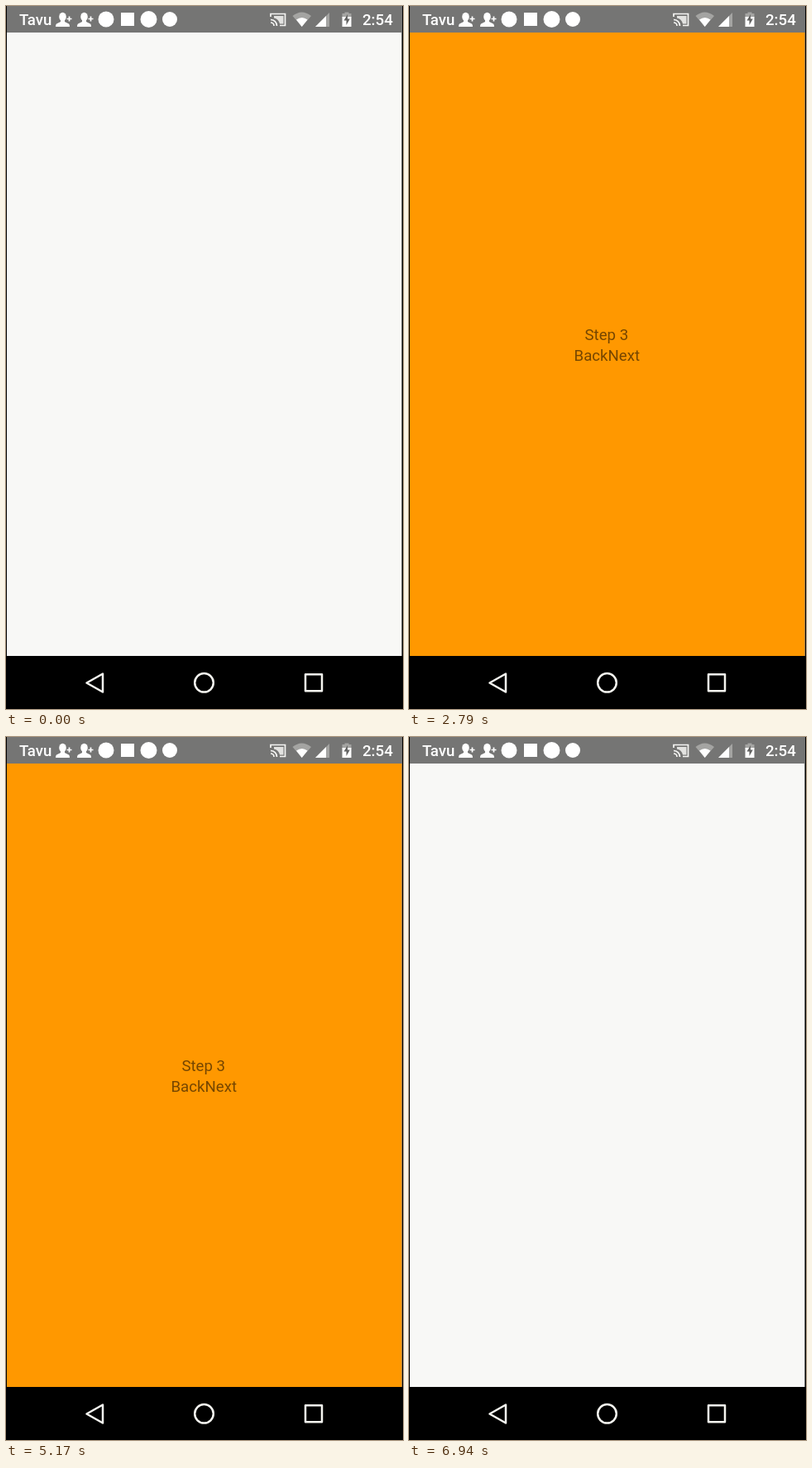
Recreate the animation shown at these times as an HTML page. Size 480x848 px, loop 6.98 s.

```html
<!DOCTYPE html>
<html lang="en">
<head>
<meta charset="utf-8">
<title>Step wizard</title>
<style>
  html, body { margin: 0; width: 100%; height: 100%; overflow: hidden; background: #000; }
  svg { display: block; width: 480px; height: 848px; }
  text { font-family: Roboto, sans-serif; font-size: 18.67px; }
  .label { fill: #000; fill-opacity: .54; text-anchor: middle; }
  .status { fill: #fff; font-weight: 500; }
  .dim { fill: #a4a4a2; }
  .nav { fill: none; stroke: #f5f5f0; stroke-width: 2.5; stroke-linejoin: round; }
</style>
</head>
<body>
<svg viewBox="0 0 480 848">
  <defs>
    <clipPath id="screen"><rect x="1" y="32" width="477.5" height="752"/></clipPath>
    <g id="contact">
      <ellipse cx="8.5" cy="13" rx="4.3" ry="5.2"/>
      <path d="M6 16h5v3l5 2.500q1 .6 1 3.500H0q0-2.900 1-3.500l5-2.500z"/>
      <path d="M13.500 15.500h6M16.500 12.500v6" stroke="#fff" stroke-width="1.7"/>
    </g>
  </defs>

  <rect x="1" width="477.5" height="784" fill="#f8f8f6"/>
  <g clip-path="url(#screen)">
    <g id="page">
      <rect id="fill" x="1" y="32" width="478" height="752"/>
      <text id="title" class="label" x="238.8" y="403"></text>
      <text class="label" x="239.3" y="428">BackNext</text>
    </g>
  </g>

  <rect x="1" width="477.5" height="32" fill="#757574"/>
  <g fill="#fff">
    <text class="status" x="16" y="23">Tavu</text>
    <use href="#contact" x="60"/>
    <use href="#contact" x="86"/>
    <circle cx="121" cy="16" r="9.5"/>
    <rect x="139" y="8" width="16" height="16"/>
    <circle cx="172.5" cy="16" r="10"/>
    <circle cx="198" cy="16" r="9"/>
    <path d="M320 13v-3.500h17.500v14H331M320 16.500a7.500 7.500 0 0 1 7.500 7.500M320 20a4 4 0 0 1 4 4" fill="none" stroke="#f5f5f3" stroke-width="1.7"/>
    <path d="M324 12h11.500v9.500H331q-1.500-6-7-7z" fill="#e2e2e0"/>
    <path class="dim" d="M346.500 12Q357.500 3 369 12L357.700 25z"/>
    <path d="M351 16.500Q357.700 11.500 364.500 16.500L357.700 25z"/>
    <path class="dim" d="M391 8v17h-17z"/>
    <path d="M387 12v13h-13z"/>
    <path class="dim" d="M406.500 9h3V7.500h5V9h3v5h-11z"/>
    <path d="M406.500 13h11v12h-11z"/>
    <path d="M413 10l-4.500 7.500h3V23l4.300-7.500H413z" fill="#636362"/>
    <text class="status" x="431" y="23">2:54</text>
  </g>

  <g class="nav">
    <path d="M97.500 816.500L117 805.500v22z"/>
    <circle cx="239.5" cy="816.3" r="11.3"/>
    <rect x="362" y="806.3" width="20" height="20"/>
  </g>
</svg>
<script>
  const LOOP = 6980, WIDTH = 480;
  const COLORS = { 2: '#fac858', 3: '#ff9800', 4: '#2094f5' };
  // Each page springs in from one side: -1 left, 1 right.
  const MOVES = [
    { at: 0, step: 2, side: -1 },
    { at: 1084.7, step: 3, side: -1 },
    { at: 2966, step: 4, side: -1 },
    { at: 4224.7, step: 3, side: 1 },
    { at: 5689.7, step: 2, side: 1 },
    { at: 6930, step: 1, side: 1 }
  ];
  const STIFFNESS = 230, DAMPING = 22;
  const decay = DAMPING / 2, freq = Math.sqrt(STIFFNESS - decay * decay);
  const [page, fill, title] = ['page', 'fill', 'title'].map(id => document.getElementById(id));

  // Remaining share of the distance after s seconds.
  function spring(s) {
    return Math.exp(-decay * s) * (Math.cos(freq * s) + decay / freq * Math.sin(freq * s));
  }

  let shown = 0;
  function show(step) {
    if (step === shown) return;
    shown = step;
    page.style.display = COLORS[step] ? '' : 'none';
    fill.setAttribute('fill', COLORS[step] || 'none');
    title.textContent = 'Step ' + step;
  }

  function draw(t) {
    const move = MOVES.filter(m => m.at <= t).pop();
    const x = move.side * WIDTH * spring((t - move.at) / 1000);
    show(move.step);
    page.setAttribute('transform', `translate(${x.toFixed(2)} 0)`);
  }

  const start = performance.now();
  function tick() {
    draw((performance.now() - start) % LOOP);
    requestAnimationFrame(tick);
  }
  tick();
</script>
</body>
</html>
```
